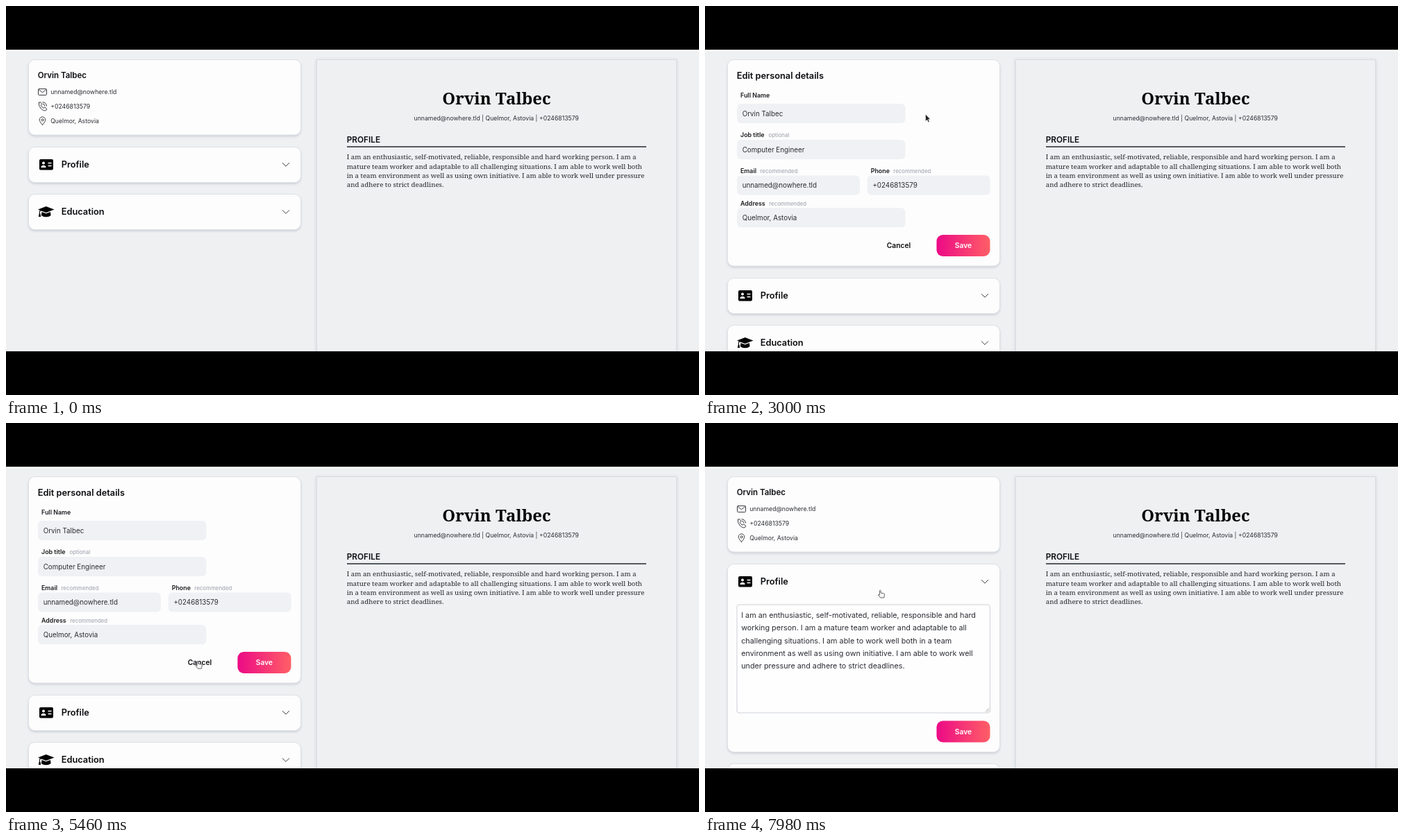
An HTML page for the animation above (8 s loop, 998 by 561 pixels).

```html
<!DOCTYPE html>
<html lang="en">
<head>
<meta charset="utf-8">
<title>Resume builder</title>
<style>
  html, body { margin: 0; width: 100%; height: 100%; overflow: hidden; background: #000; }
  svg { display: block; width: 100vw; height: 100vh; }
  text { font-family: Inter, "Open Sans", sans-serif; fill: #2b2d33; }
  .heading { font-size: 12.8px; font-weight: 600; fill: #0c0d10; }
  .name { font-size: 11.5px; font-weight: 600; fill: #0c0d10; }
  .small { font-size: 8.7px; }
  .label { font-size: 8.9px; font-weight: 600; fill: #1b1c20; }
  .hint { font-size: 7.8px; font-weight: 500; fill: #a6a9b5; }
  .input { font-size: 9.8px; }
  .area { font-size: 10.8px; }
  .button { font-size: 10.3px; font-weight: 600; fill: #0c0d10; text-anchor: middle; }
  .white { fill: #fff; }
  .section { font-size: 11.8px; font-weight: 600; fill: #0c0d10; }
  .title, .serif { font-family: "Noto Serif", Georgia, serif; }
  .title { font-size: 24px; font-weight: 700; fill: #060606; }
  .serif { font-size: 9.7px; fill: #26272b; }
  .center { text-anchor: middle; }
  .card { fill: #fdfdfd; stroke: #dfe1e4; filter: drop-shadow(0 2px 1.5px #a9afbc70); }
  .field { fill: #eff1f4; }
  .line { fill: none; stroke: #3a3b40; stroke-linecap: round; stroke-linejoin: round; }
</style>
</head>
<body>
<script>
const LOOP = 8000;
const FORM_OPENS = 2720, FORM_CLOSES = 5800;
const PROFILE_OPENS = 6880, UNFOLD = 200;
const CURSOR_SHOWS = 1800;

const person = {
  name: "Orvin Talbec",
  email: "unnamed@nowhere.tld",
  phone: "+0246813579",
  place: "Quelmor, Astovia",
};

const text = (x, y, style, content) => `<text x="${x}" y="${y}" class="${style}">${content}</text>`;
const lines = (x, y, step, style, rows) => rows.map((row, i) => text(x, y + i * step, style, row)).join("");
const rect = (x, y, w, h, r, attrs = "") => `<rect x="${x}" y="${y}" width="${w}" height="${h}" rx="${r}" ${attrs}/>`;
const path = (d, attrs = "") => `<path d="${d}" ${attrs}/>`;
const outline = d => path(d, 'class="line"');
const card = (y, h, id = "") => rect(32.5, y, 392, h, 9, `class="card" ${id && `id="${id}"`}`);
const save = y => rect(333.5, y, 77, 31, 9, 'fill="url(#pink)"') + text(372, y + 19, "button white", "Save");

const field = (x, y, w, value, label, labelY, hint = "", hintX = 0) =>
  rect(x, y, w, 28, 6, 'class="field"') + text(x + 7.7, y + 17.5, "input", value) +
  text(x + 5, labelY, "label", label) + text(hintX, labelY, "hint", hint);

const mailIcon = rect(46.5, 119.5, 12, 9, 1.2, 'class="line"') + outline("M47 120.5l5.5 4.2l5.5-4.2");
const phoneIcon = outline("M47.5 139.3l2-.9l2.2 3.2l-1.4 1.7q1.2 2.6 3.7 4l1.8-1.3l3 2.3l-1 2q-3 2-7.3-2.2t-3-8.8z") +
  outline("M53 138.6q5 .5 5.5 5.5M53 141q2.7 .4 3.1 3.1");
const pinIcon = outline("M52.5 171.5q-4.3-5-4.3-7.3a4.3 4.3 0 0 1 8.6 0q0 2.3-4.3 7.3z") +
  '<circle cx="52.5" cy="164.3" r="1.5" class="line"/>';
const badgeIcon = rect(48, 221, 20, 15.5, 2) + '<circle cx="54" cy="226.5" r="2" fill="#fff"/>' +
  path("M50.5 233q0-3.2 3.5-3.2t3.5 3.2z", 'fill="#fff"') +
  path("M60.5 226.5h5M60.5 230.5h5", 'stroke="#fff" stroke-width="1.5"');
const capIcon = path("M46 293.5L57.7 289L69.5 293.5L57.7 298z") +
  path("M51.5 297l6.2 2.3l6.2-2.3l.7 5q-2.5 2.3-6.9 2.3t-6.9-2.3z") +
  path("M57.7 293.5l-9.2 2v5", 'fill="none" stroke="#000"') +
  path("M47.7 299.5h1.7l.8 4.5h-3.3z");
const chevron = y => outline(`M398.3 ${y - 2.3}l4.7 4.7l4.7-4.7`);

const summaryCard = card(77.5, 108.5) + text(45.7, 104, "name", person.name) +
  mailIcon + text(64.2, 127, "small", person.email) +
  phoneIcon + text(64.2, 148, "small", person.phone) +
  pinIcon + text(64.2, 169, "small", person.place);

const formCard = card(77.5, 297.5) + text(45.7, 104.5, "heading", "Edit personal details") +
  field(46, 141, 242.5, person.name, "Full Name", 132) +
  field(46, 193, 242.5, "Computer Engineer", "Job title", 189.3, "optional", 91.5) +
  field(46, 244.5, 177, person.email, "Email", 241.3, "recommended", 79.5) +
  field(233.7, 244.5, 177, person.phone, "Phone", 241.3, "recommended", 271.3) +
  field(46, 291.3, 242.5, person.place, "Address", 288, "recommended", 92.2) +
  text(279, 349, "button", "Cancel") + save(330);

const profileText = rect(46, 262, 364.5, 156, 3, 'fill="#fefefe" stroke="#cdd0d6"') +
  lines(52.2, 281, 18.35, "area", [
    "I am an enthusiastic, self-motivated, reliable, responsible and hard",
    "working person. I am a mature team worker and adaptable to all",
    "challenging situations. I am able to work well both in a team",
    "environment as well as using own initiative. I am able to work well",
    "under pressure and adhere to strict deadlines.",
  ]) +
  path("M404 416.5l5-5M407 416.5l2-2", 'stroke="#888" stroke-width=".8"') + save(429.5);

const paper = rect(447.5, 77.5, 518, 440, 0,
    'fill="#eef0f2" stroke="#d9dce1" style="filter:drop-shadow(0 1px 2px #a9afbc80)"') +
  text(706.5, 142, "title center", person.name) +
  text(706.3, 165, "small center", `${person.email} | ${person.place} | ${person.phone}`) +
  text(490.7, 197, "section", "PROFILE") +
  path("M491 203H922", 'stroke="#22282c" stroke-width="1.4"') +
  lines(490.7, 221.3, 13.2, "serif", [
    "I am an enthusiastic, self-motivated, reliable, responsible and hard working person. I am a",
    "mature team worker and adaptable to all challenging situations. I am able to work well both",
    "in a team environment as well as using own initiative. I am able to work well under pressure",
    "and adhere to strict deadlines.",
  ]);

const arrow = path("M0 0V10.3L2.4 8.2L4 11.8L5.7 11L4.2 7.5H7.2z",
  'id="arrow" fill="#222326" stroke="#fff" stroke-width=".6"');
const hand = path("M-.9 1q.9-1.4 1.8 0v3.2l4.5 .9q1.2 .4 1 1.8l-.9 4.3h-5.2l-3.3-4q.3-1.3 2.1 0z",
  'id="hand" fill="#f4f4f4" stroke="#55575c" stroke-width=".9" stroke-linejoin="round"');

document.body.innerHTML = `
<svg viewBox="0 0 998 561">
  <defs>
    <linearGradient id="pink"><stop stop-color="#ec0a86"/><stop offset="1" stop-color="#ff5f66"/></linearGradient>
    <clipPath id="page"><rect y="63" width="998" height="435"/></clipPath>
    <clipPath id="fold"><rect id="foldArea" x="32" y="203" width="393"/></clipPath>
  </defs>
  <rect width="998" height="561"/>
  <g clip-path="url(#page)">
    <rect width="998" height="561" fill="#eef0f2"/>
    <rect y="63" width="998" height="3" fill="#f9f9f6"/>
    ${paper}
    <g id="summary">${summaryCard}</g>
    <g id="form">${formCard}</g>
    <g id="profile">
      ${card(203.5, 51, "profileCard")}${badgeIcon}${text(79.7, 233.2, "heading", "Profile")}${chevron(228.7)}
      <g id="profileText" clip-path="url(#fold)">${profileText}</g>
    </g>
    <g id="education">
      ${card(271.5, 51)}${capIcon}${text(79.7, 301.4, "heading", "Education")}${chevron(297)}
    </g>
    <g id="cursor">${arrow}${hand}</g>
  </g>
</svg>`;

const el = id => document.getElementById(id);
const show = (id, visible) => el(id).setAttribute("display", visible ? "inline" : "none");
const move = (id, x, y) => el(id).setAttribute("transform", `translate(${x} ${y})`);
const clamp = v => Math.min(1, Math.max(0, v));
const smooth = v => v * v * (3 - 2 * v);

// Pointer stops: time, x, y
const stops = [
  [1800, 400, 62], [2400, 317.5, 156], [3000, 317.5, 156], [3740, 313.5, 167.3],
  [4900, 274.5, 333.5], [5150, 276, 343], [5850, 276, 343], [6400, 252.3, 240.8],
];

function pointerAt(t) {
  const next = stops.findIndex(stop => stop[0] > t);
  if (next <= 0) return stops.at(next).slice(1);
  const [t0, x0, y0] = stops[next - 1], [t1, x1, y1] = stops[next];
  const k = smooth((t - t0) / (t1 - t0));
  return [x0 + (x1 - x0) * k, y0 + (y1 - y0) * k];
}

function draw(now) {
  const t = now % LOOP;
  const editing = t >= FORM_OPENS && t < FORM_CLOSES;
  const unfold = 220 * smooth(clamp((t - PROFILE_OPENS) / UNFOLD));
  const shift = editing ? 189 : 0;

  show("summary", !editing);
  show("form", editing);
  show("profileText", unfold > 0);
  el("profileCard").setAttribute("height", 51 + unfold);
  el("foldArea").setAttribute("height", 51 + unfold);
  move("profile", 0, shift);
  move("education", 0, shift + unfold);

  const [x, y] = pointerAt(t);
  const pointing = editing ? y > 335 : y < 322;
  show("cursor", t >= CURSOR_SHOWS);
  show("hand", pointing);
  show("arrow", !pointing);
  move("cursor", x, y);
  requestAnimationFrame(draw);
}
requestAnimationFrame(draw);
</script>
</body>
</html>
```
